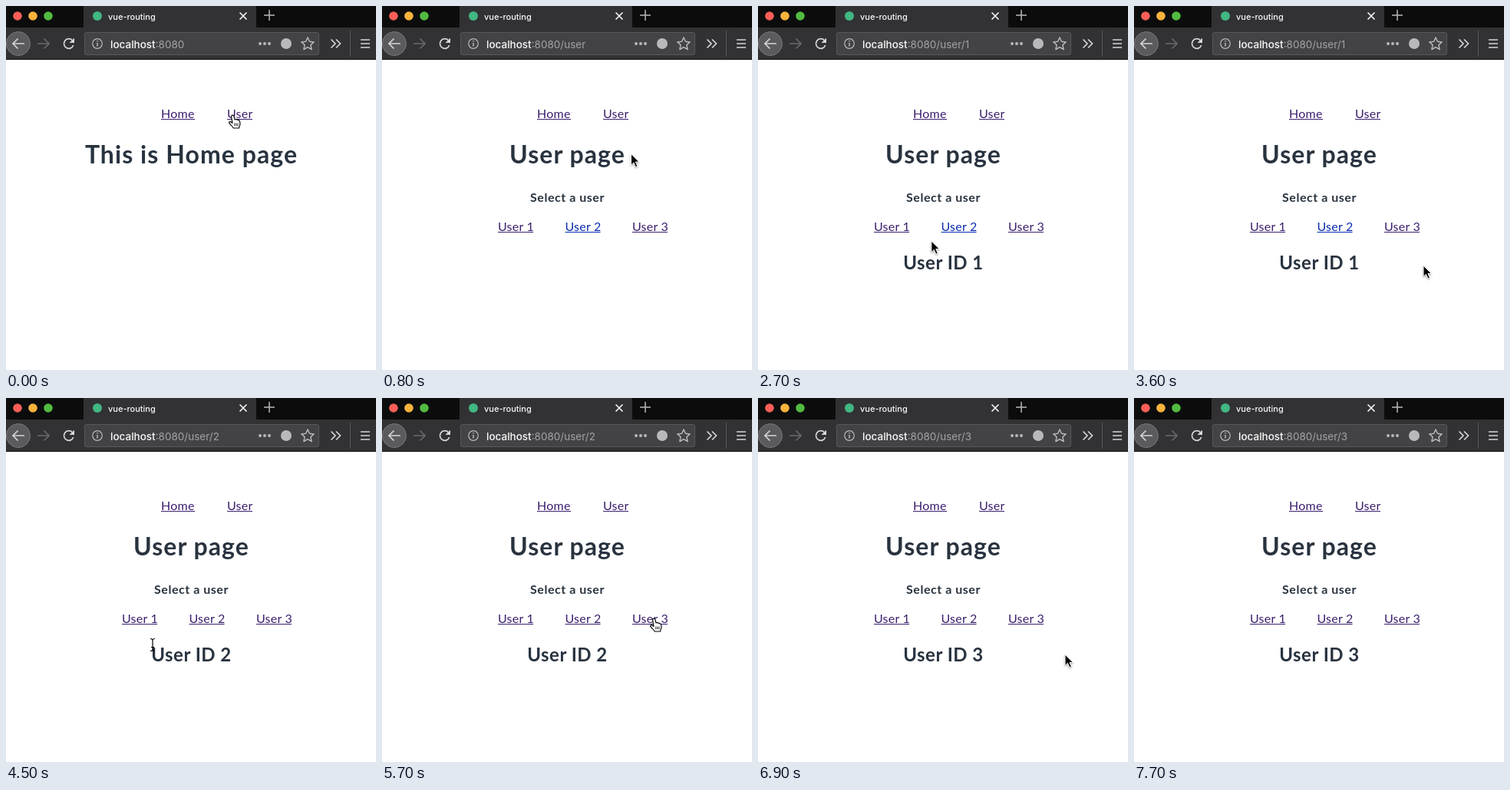
Write an HTML page that moves like this. It is 482 px wide and 474 px high and loops after 8.6 s.

```html
<!DOCTYPE html>
<html lang="en">
<head>
<meta charset="utf-8">
<title>vue-routing</title>
<style>
  html, body { margin: 0; width: 100%; height: 100%; overflow: hidden; background: #fff; }
  svg { display: block; }
  .ui { font-family: Inter, sans-serif; font-weight: 500; }
  .page { font-family: Lato, sans-serif; }
  .head { font-weight: 700; text-anchor: middle; letter-spacing: .033em; fill: #28333f; }
  .link { font-size: 16px; letter-spacing: .015em; fill: #3c1f6e; }
  .line { stroke: #3c1f6e; }
  .new .link { fill: #0a2bb0; }
  .new .line { stroke: #0a2bb0; }
  .icon { fill: none; stroke: #b9b9bb; stroke-width: 1.7; }
  .bright { stroke: #d5d5d7; }
</style>
</head>
<body>
<svg width="482" height="474" viewBox="0 0 482 474">
  <defs>
    <g id="hand" transform="scale(.96)">
      <path d="M-2 1.6Q-1.8-.4-.2-.4Q1.1-.4 1.5 1.2L2.6 5.6Q4 4.6 5.1 5.8Q6.5 5.1 7.3 6.5Q8.9 6.2 9.4 8L9.9 11Q10 13.6 8.7 15.4L8.5 17.2H.8Q-.4 15.2-2.6 13.2L-5 10.2Q-5.5 8.4-3.5 8.4L-.6 10.4Z" fill="#fff" stroke="#000" stroke-width="1.2" stroke-linejoin="round"/>
      <path d="M2.4 10.500v3.800M4.600 10.500v3.800M6.800 10.500v3.800" stroke="#000" stroke-width=".9"/>
    </g>
    <path id="arrow" d="M0 0V14.5L3.4 11.3L6 17L8.4 16L5.9 10.4H10.4Z" stroke="#fff" style="filter:drop-shadow(0 1px 1px #0006)"/>
    <path id="beam" d="M-3-8Q0-8 0-6Q0-8 3-8M0-6.5V6.5M-3 8Q0 8 0 6Q0 8 3 8M-2 3H2" fill="none" stroke="#000" stroke-width="1.2"/>
  </defs>

  <g class="ui">
    <path fill="#0c0c0d" d="M0 0h482v28H0z"/>
    <path fill="#323234" d="M101 0h225v28H101zM0 28h482v41H0z"/>
    <path fill="#0c0c0d" d="M0 69h482v1H0z"/>
    <circle cx="15" cy="13" r="5.800" fill="#f85f56"/>
    <circle cx="35" cy="13" r="5.800" fill="#f9b43c"/>
    <circle cx="55" cy="13" r="5.800" fill="#52bb40"/>
    <circle cx="119" cy="13" r="6" fill="#41b883"/>
    <text x="133" y="17.500" font-size="11" fill="#f9f9fa">vue-routing</text>
    <path class="icon" style="stroke:#f4f4f5" d="M304.500 8.500l9 9m0-9l-9 9"/>
    <path class="icon" style="stroke-width:1.5" d="M336 12h14M343 5v14"/>

    <circle cx="16" cy="49" r="15.500" fill="#5b5b5d" stroke="#77777a"/>
    <path class="icon bright" d="M24 49H9.500M15.500 42.500L9 49l6.500 6.500"/>
    <path class="icon" style="stroke:#69696b" d="M41 49h14.500M49.500 42.500L56 49l-6.500 6.500"/>
    <path class="icon bright" d="M86.500 44.800A6.300 6.300 0 1 0 87.800 51"/>
    <path fill="#d5d5d7" d="M89 41.500v6.500h-6.500z"/>
    <rect x="102.500" y="34.500" width="305" height="29" rx="2.500" fill="#434345" stroke="#58585b"/>
    <circle class="icon" cx="119" cy="49" r="6.300" style="stroke-width:1.2"/>
    <path class="icon" style="stroke-width:1.5" d="M119 48v4.500M119 45v1.600"/>
    <text x="136" y="54.500" font-size="13.500" font-weight="400" fill="#a3a3a6"><tspan fill="#f9f9fa" font-weight="500">localhost</tspan>:8080<tspan id="path"></tspan></text>
    <g fill="#b9b9bb">
      <circle cx="331" cy="49" r="2"/>
      <circle cx="337" cy="49" r="2"/>
      <circle cx="343" cy="49" r="2"/>
      <circle cx="365" cy="49" r="7"/>
    </g>
    <path class="icon" style="stroke-width:1.5;stroke-linejoin:round" d="M393 41l2.400 5.300 5.800.6-4.300 3.900 1.200 5.700-5.100-2.900-5.100 2.900 1.200-5.700-4.300-3.900 5.800-.6z"/>
    <path class="icon bright" d="M423.500 43.500l5.500 5.500-5.500 5.500M430 43.500l5.500 5.500-5.500 5.500"/>
    <path stroke="#58585b" d="M448.500 32v34"/>
    <path class="icon bright" d="M462 44h12M462 49h12M462 54h12"/>
  </g>

  <g class="page">
    <text class="link" x="202" y="146">Home</text>
    <text class="link" x="288" y="146">User</text>
    <path class="line" d="M202 147.500h44M288 147.500h33"/>
    <text class="head" id="title" x="241.500" y="205" font-size="32"></text>
    <g id="list">
      <text class="head" x="241.500" y="255" font-size="16">Select a user</text>
      <g>
        <text class="link" x="151" y="293">User 1</text>
        <path class="line" d="M151 294.500h46"/>
      </g>
      <g id="second">
        <text class="link" x="238.500" y="293">User 2</text>
        <path class="line" d="M238.500 294.500h46"/>
      </g>
      <g>
        <text class="link" x="326" y="293">User 3</text>
        <path class="line" d="M326 294.500h46"/>
      </g>
    </g>
    <text class="head" id="user" x="241.500" y="343" font-size="24" style="letter-spacing:.02em"></text>
  </g>
  <use id="cursor"/>
</svg>
<script>
const LOOP = 8600, STEP = 100, IDLE = 200;
const $ = id => document.getElementById(id);

// Clicks on User, User 1, User 2 and User 3
const clicks = [200, 2300, 4200, 5900];

// Cursor moves; bend bows the path sideways
const move = (from, to, x, y, bend = 0) => ({ from, to, x, y, bend });
const moves = [
  move(0, 0, 295.5, 142.5),
  move(700, 1600, 175.5, 295.5, 1.4),
  move(2600, 3000, 377, 338),
  move(3600, 4000, 260, 288),
  move(4300, 4500, 191, 321.5),
  move(4900, 5100, 367, 335.5),
  move(5500, 5700, 354.5, 287.5),
  move(6000, 6300, 183, 332.5),
  move(6700, 6800, 400, 334),
  move(7400, 7500, 400, 334)
];

function cursorAt(t) {
  const i = moves.filter(m => m.from <= t).length - 1;
  const b = moves[i], a = moves[i - 1] || b;
  const k = t < b.to ? (t - b.from) / (b.to - b.from) : 1;
  const bow = 2 * k * (1 - k) * b.bend;
  const dx = b.x - a.x, dy = b.y - a.y;
  return { x: a.x + dx * k + dy * bow, y: a.y + dy * k - dx * bow, idle: t >= b.to + IDLE };
}

function covers(el, { x, y }) {
  const b = el.getBBox();
  return x >= b.x && x <= b.x + b.width && y >= b.y && y <= b.y + b.height;
}

function shapeAt(point) {
  const over = kind => [...document.querySelectorAll(kind)].some(el => covers(el, point));
  return over('.link') ? 'hand' : over('.head') ? 'beam' : 'arrow';
}

function showPage(t) {
  const visits = clicks.filter(c => c <= t).length;
  const id = visits - 1;
  $('path').textContent = (visits ? '/user' : '') + (id > 0 ? '/' + id : '');
  $('title').textContent = visits ? 'User page' : 'This is Home page';
  $('list').style.display = visits ? '' : 'none';
  $('second').setAttribute('class', id < 2 ? 'new' : '');
  $('user').textContent = id > 0 ? 'User ID ' + id : '';
}

// An idle cursor vanishes unless it rests on a link
function showCursor(t) {
  const point = cursorAt(t), shape = shapeAt(point), cursor = $('cursor');
  cursor.setAttribute('href', '#' + shape);
  cursor.setAttribute('transform', `translate(${point.x} ${point.y})`);
  cursor.style.display = point.idle && shape !== 'hand' ? 'none' : '';
}

const start = performance.now();
function tick() {
  const t = Math.floor((performance.now() - start) % LOOP / STEP) * STEP;
  showPage(t);
  showCursor(t);
  requestAnimationFrame(tick);
}
tick();
</script>
</body>
</html>
```
